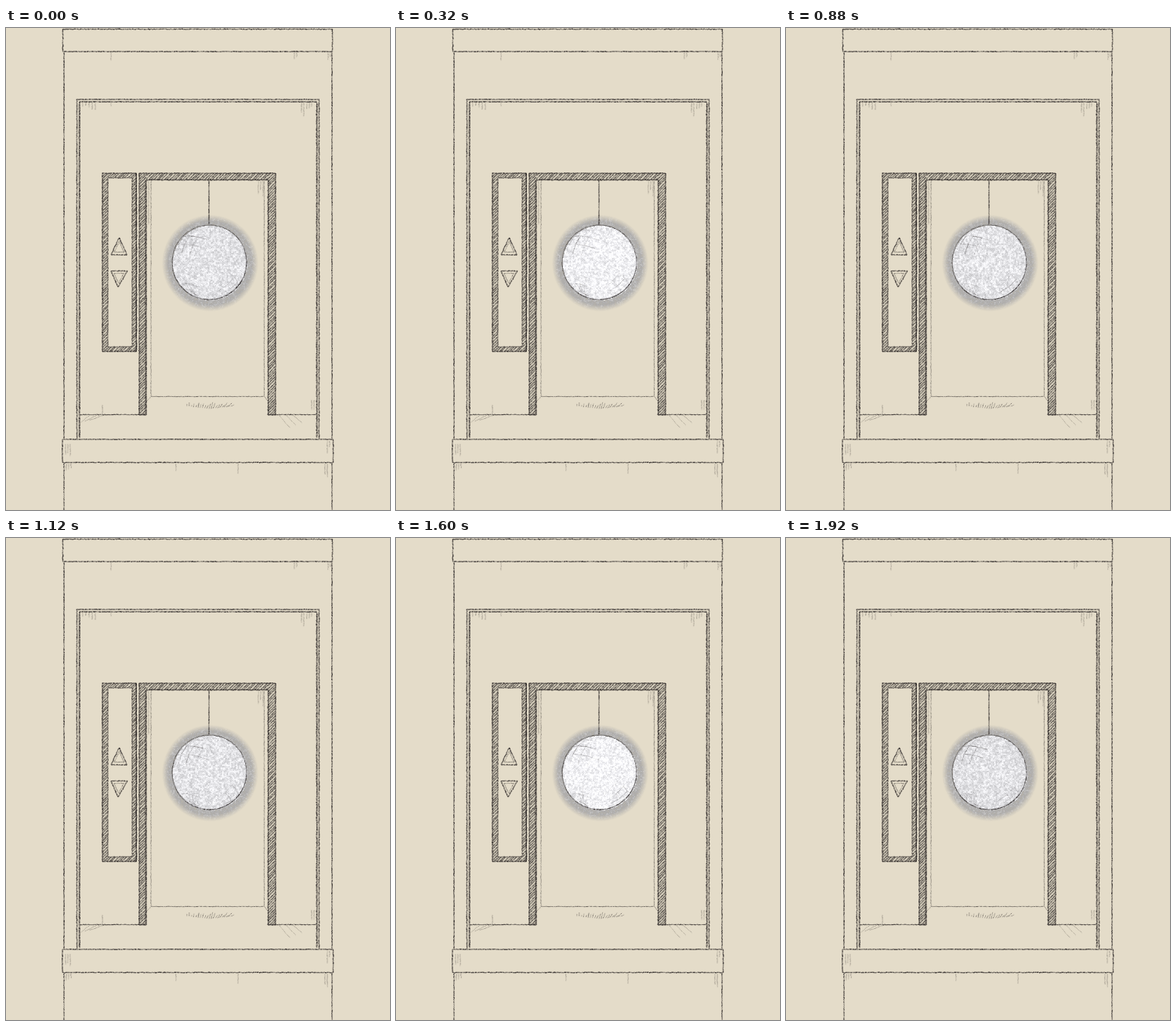
An HTML page with a canvas for the animation above (2 s loop, 490 px wide and 614 px high).

```html
<!DOCTYPE html>
<html lang="en">
<head>
<meta charset="utf-8">
<title>Mirror ball in a lift</title>
<style>
html, body { margin: 0; width: 100%; height: 100%; overflow: hidden; background: #e4dcc9; }
canvas { display: block; }
</style>
</head>
<body>
<canvas id="stage" width="490" height="614"></canvas>
<script>
const W = 490, H = 614, LOOP = 2000, STEP = 80;
const BALL = { x: 259.5, y: 298.5, r: 47.5 };
const BOX = 128, GRID = 66, TAU = Math.PI * 2;
const INK = '44,39,38';

const clamp = (v, lo = 0, hi = 1) => Math.min(hi, Math.max(lo, v));

function seeded(s) {
  return () => {
    s = (s + 0x6D2B79F5) | 0;
    let t = Math.imul(s ^ (s >>> 15), 1 | s);
    t = (t + Math.imul(t ^ (t >>> 7), 61 | t)) ^ t;
    return ((t ^ (t >>> 14)) >>> 0) / 4294967296;
  };
}

function layer(w, h) {
  const c = document.createElement('canvas');
  c.width = w;
  c.height = h;
  return c;
}

// Grainy pencil stroke made of short, jittered dabs
function pencil(g, rnd, x1, y1, x2, y2, w = 1.1, alpha = 0.8, wobble = 0.6) {
  const len = Math.hypot(x2 - x1, y2 - y1), n = Math.max(1, Math.round(len / 1.5));
  const dx = (x2 - x1) / n, dy = (y2 - y1) / n;
  g.lineWidth = w;
  for (let i = 0; i < n; i++) {
    const jx = (rnd() - 0.5) * wobble, jy = (rnd() - 0.5) * wobble;
    g.strokeStyle = `rgba(${INK},${alpha * (0.4 + 0.6 * rnd())})`;
    g.beginPath();
    g.moveTo(x1 + dx * i + jx, y1 + dy * i + jy);
    g.lineTo(x1 + dx * (i + 1.1) + jx, y1 + dy * (i + 1.1) + jy);
    g.stroke();
  }
}

function drawRoom() {
  const c = layer(W, H), g = c.getContext('2d'), rnd = seeded(11);
  const line = (...a) => pencil(g, rnd, ...a);
  const path = (pts, w, alpha) => {
    for (let i = 2; i < pts.length; i += 2)
      line(pts[i - 2], pts[i - 1], pts[i], pts[i + 1], w, alpha);
  };
  const box = (x1, y1, x2, y2, w, alpha) =>
    path([x1, y1, x2, y1, x2, y2, x1, y2, x1, y1], w, alpha);

  // Diagonal shading clipped to a bar
  function hatch(x, y, w, h) {
    g.save();
    g.beginPath();
    g.rect(x, y, w, h);
    g.clip();
    g.fillStyle = `rgba(${INK},.08)`;
    g.fillRect(x, y, w, h);
    for (let s = x + y; s < x + y + w + h; s += 3.4) {
      const d = rnd() * 1.4;
      line(x, s - x + d, x + w, s - x - w + d, 1.2, 0.85, 0.5);
    }
    g.restore();
  }

  // Bunch of fading vertical strokes
  function drips(x, y, n, len, gap = 3) {
    for (let i = 0; i < n; i++)
      line(x + i * gap, y, x + i * gap, y + len * (0.35 + 0.65 * rnd()), 0.8, 0.4);
  }

  g.fillStyle = '#e4dcc9';
  g.fillRect(0, 0, W, H);

  // Shaft and bands
  box(72.5, 1.5, 416.5, 30, 1.4, 0.92);
  box(72, 524, 417.5, 553.5, 1.4, 0.92);
  for (const x of [74, 416]) {
    line(x, 31, x, 523, 1.4, 0.88);
    line(x, 554, x, H, 1.3, 0.82);
  }

  // Recess
  path([90.5, 523, 90.5, 91, 399.5, 91, 399.5, 523], 1.4, 0.9);
  path([94, 522, 94, 94, 396.5, 94, 396.5, 522], 1.5, 0.95);
  line(93, 97, 93, 520, 1, 0.5);
  line(397.5, 97, 397.5, 520, 0.9, 0.45);
  line(95, 492.5, 178, 492.5, 1.2, 0.9);
  line(334, 492.5, 396, 492.5, 1.2, 0.9);

  // Door frame
  hatch(170, 185, 9, 308);
  hatch(179, 185, 155, 8.5);
  hatch(334, 185, 10, 308);
  path([170, 493, 170, 185, 344, 185, 344, 493, 334.5, 493, 334.5, 193.5,
    179, 193.5, 179, 493, 170, 493], 1.3, 0.95);
  line(178, 194, 178, 490, 1.2, 0.6);
  line(180, 193.5, 334, 193.5, 1, 0.5);

  // Cabin
  for (const x of [185, 329.5]) line(x, 195, x, 469, 0.9, 0.5);
  line(185, 469.5, 330, 469.5, 1, 0.65);
  line(185, 470, 179, 476, 0.9, 0.5);
  line(330, 470, 335, 476, 0.9, 0.5);
  drips(182, 195, 1, 60);
  drips(322, 195, 3, 22);
  for (let x = 229; x < 292; x += 3) {
    const edge = 1 - Math.abs(x - 260) / 36;
    line(x + 2, 477 + rnd() * 4, x + (260 - x) * 0.07, 481 + 4 * edge, 0.9, 0.58);
  }

  // Call panel
  hatch(123, 185, 7, 227);
  hatch(161, 185, 6, 227);
  hatch(130, 185, 31, 6);
  hatch(130, 406, 31, 6);
  box(123, 185, 166.5, 412, 1.4, 0.95);
  box(130, 191, 161, 406, 1.1, 0.85);
  line(166, 186, 166, 412, 1.2, 0.65);
  path([144.5, 267, 134, 289, 154.5, 289, 144.5, 267], 1.3, 0.92);
  path([144.5, 272, 138, 285.5, 150.5, 285.5, 144.5, 272], 0.8, 0.6);
  path([134, 309.5, 155, 309.5, 143, 330, 134, 309.5], 1.3, 0.92);
  path([138, 312.5, 150.5, 312.5, 143.5, 325, 138, 312.5], 0.8, 0.6);

  // Loose shading
  drips(134, 31, 1, 18);
  drips(368, 31, 2, 16);
  drips(411, 32, 2, 12);
  drips(98, 95, 5, 11, 4);
  drips(134, 95, 1, 12);
  drips(377, 95, 2, 32);
  drips(384, 95, 3, 12);
  drips(76, 530, 3, 17);
  drips(410, 526, 2, 20);
  drips(77, 555, 3, 17);
  drips(217, 555, 1, 14);
  drips(296, 555, 1, 20);
  drips(407, 555, 2, 24);
  drips(170, 474, 2, 18);
  drips(338, 474, 2, 18);
  drips(123, 480, 1, 14);
  drips(390, 474, 2, 18);
  for (let i = 0; i < 3; i++) {
    line(107 + i * 9, 493, 96 + i * 5, 502 - i, 0.8, 0.36);
    line(348 + i * 9, 493, 362 + i * 8, 503 + (2 - i) * 3, 0.8, 0.36);
  }
  return c;
}

const room = drawRoom();
const glow = layer(BOX, BOX), glowCtx = glow.getContext('2d');

// Speckled disc and its smoky rim
function paintGlow(step, pulse) {
  const img = glowCtx.createImageData(BOX, BOX), rnd = seeded(500 + step * 97);
  const cells = Array.from({ length: GRID * GRID }, rnd);
  const blotch = (x, y) => {
    const u = x / 2, v = y / 2, i = u | 0, j = v | 0, a = u - i, b = v - j, k = j * GRID + i;
    return (cells[k] * (1 - a) + cells[k + 1] * a) * (1 - b) +
      (cells[k + GRID] * (1 - a) + cells[k + GRID + 1] * a) * b - 0.5;
  };
  for (let y = 0; y < BOX; y++) {
    for (let x = 0; x < BOX; x++) {
      const r = Math.hypot(x - BOX / 2, y - BOX / 2);
      const grain = blotch(x, y) * 46 + (rnd() - 0.5) * 26;
      let v, alpha = 1;
      if (r < BALL.r) {
        v = 237 + 10 * pulse - 6 * (r / BALL.r) ** 4 + grain;
      } else {
        v = 165 + grain * 0.9;
        alpha = clamp((61.5 - r) / 8) * 0.85 * clamp(1 + grain / 70);
      }
      const p = (y * BOX + x) * 4;
      img.data[p] = img.data[p + 1] = v;
      img.data[p + 2] = v + 3;
      img.data[p + 3] = alpha * 255;
    }
  }
  glowCtx.putImageData(img, 0, 0);
}

const ctx = document.getElementById('stage').getContext('2d');

// Project a point of the tilted, turning sphere
function onBall(lat, lon) {
  const x = Math.cos(lat) * Math.sin(lon), z = Math.cos(lat) * Math.cos(lon);
  const y = Math.sin(lat) * 0.95 - z * 0.3, depth = z * 0.95 + Math.sin(lat) * 0.3;
  const c = Math.cos(0.42), s = Math.sin(0.42);
  return { x: x * c - y * s, y: x * s + y * c, z: depth };
}

// Facet lines only survive near a few worn patches
const patch = (p, x, y) => Math.exp(-((p.x - x) ** 2 + (p.y - y) ** 2) / 0.07);

function facet(a, b, rnd) {
  const fade = rnd();
  if (a.z < 0.08 || b.z < 0.08) return;
  const wear = patch(a, -0.5, -0.62) + 0.7 * patch(a, 0.6, 0.5) + 0.5 * patch(a, -0.55, 0.6);
  const alpha = clamp(wear) * 0.75 * (0.3 + 0.7 * fade);
  if (alpha < 0.05) return;
  pencil(ctx, rnd, BALL.x + a.x * BALL.r, BALL.y + a.y * BALL.r,
    BALL.x + b.x * BALL.r, BALL.y + b.y * BALL.r, 0.9, alpha, 0.4);
}

function drawBall(step) {
  const t = step * STEP, cell = TAU / 20, rnd = seeded(7);
  paintGlow(step, -Math.cos(TAU * t / 1000));
  ctx.drawImage(glow, Math.round(BALL.x - BOX / 2), Math.round(BALL.y - BOX / 2));

  const turn = cell * t / LOOP;
  for (let i = -5; i <= 5; i++) {
    for (let j = -6; j <= 5; j++) {
      const lat = i * 0.28, lon = j * cell + turn;
      facet(onBall(lat, lon), onBall(lat, lon + cell), rnd);
      facet(onBall(lat, lon), onBall(lat + 0.28, lon), rnd);
    }
  }

  // Outline, heavier towards the lower right
  for (let a = 0; a < TAU; a += TAU / 150) {
    const b = a + TAU / 140, weight = 0.5 + 0.5 * Math.sin(a + 0.6);
    pencil(ctx, rnd, BALL.x + Math.cos(a) * BALL.r, BALL.y + Math.sin(a) * BALL.r,
      BALL.x + Math.cos(b) * BALL.r, BALL.y + Math.sin(b) * BALL.r,
      0.9 + 0.4 * weight, 0.65 + 0.25 * weight, 0.5);
  }
  pencil(ctx, rnd, 259, 194, 259, 250, 1.3, 0.95, 0.3);
}

let shown = -1;
function tick(now) {
  let step = Math.floor(now % LOOP / STEP);
  if (step === 7) step = 6; // brief pause at the brightest moment
  if (step !== shown) {
    shown = step;
    ctx.drawImage(room, 0, 0);
    drawBall(step);
  }
  requestAnimationFrame(tick);
}
tick(performance.now());
</script>
</body>
</html>
```
